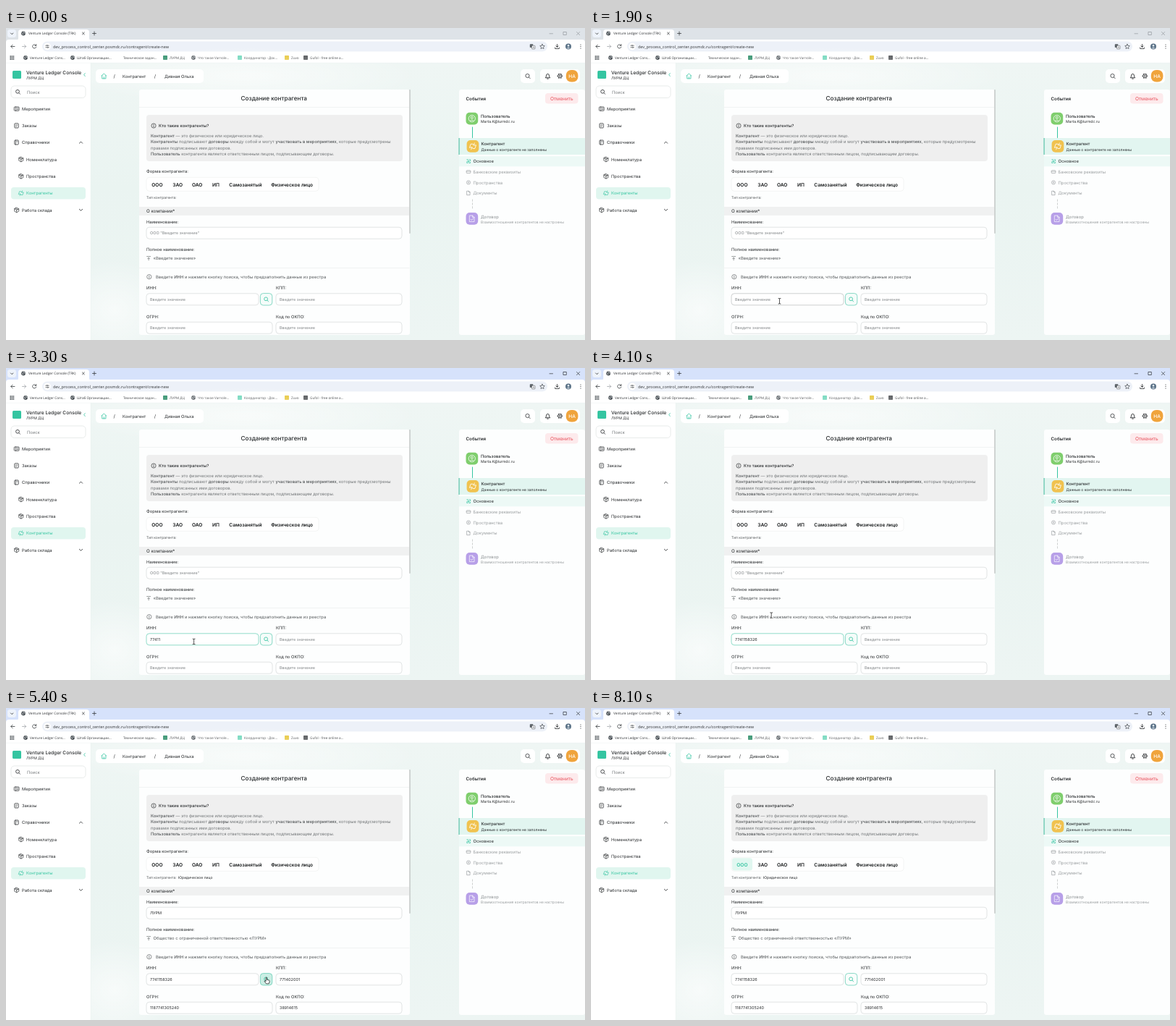
Recreate the animation shown at these times as an HTML page. Size 800x431 px, loop 8.2 s.

```html
<!DOCTYPE html>
<html lang="ru">
<head>
<meta charset="utf-8">
<title>Создание контрагента</title>
<style>
html, body { margin: 0; width: 100%; height: 100%; overflow: hidden; background: #fff; }
svg { display: block; width: 800px; height: 431px; }
text { font-family: Inter, Roboto, sans-serif; text-rendering: geometricPrecision; white-space: pre; }
text.ui { font-family: "Open Sans", "Noto Sans", sans-serif; }
</style>
</head>
<body>
<svg id="stage" viewBox="0 0 800 431" xmlns="http://www.w3.org/2000/svg">
  <defs>
    <linearGradient id="bg" x1="0" y1="0" x2="0" y2="1">
      <stop offset="0" stop-color="#eff6f4"/><stop offset=".45" stop-color="#eaf4f1"/><stop offset="1" stop-color="#edf5f3"/>
    </linearGradient>
    <radialGradient id="glow">
      <stop offset="0" stop-color="#fff" stop-opacity=".6"/><stop offset="1" stop-color="#fff" stop-opacity="0"/>
    </radialGradient>
  </defs>
</svg>
<script>
const LOOP = 8200, CLICK_FIELD = 2200, TYPE_FROM = 2800, TYPE_STEP = 90;
const OVER_BUTTON = 4800, CLICK_BUTTON = 5000, FILLED = 5400;
const MINT = '#35c5a1', EDGE = '#62cdb3', INK = '#26292b', SOFT = '#55595b', PALE = '#999d9f', B = 5.83;
const svg = document.getElementById('stage');

function add(tag, attrs, parent = svg) {
  const el = document.createElementNS('http://www.w3.org/2000/svg', tag);
  for (const k in attrs) el.setAttribute(k, attrs[k]);
  return parent.appendChild(el);
}
const box = (x, y, r, b, fill, rx = 0, stroke = 'none', w = .6) =>
  add('rect', { x, y, width: r - x, height: b - y, rx, fill, stroke, 'stroke-width': w });
const line = (d, stroke = INK, w = .8, parent = svg) =>
  add('path', { d, fill: 'none', stroke, 'stroke-width': w, 'stroke-linecap': 'round', 'stroke-linejoin': 'round' }, parent);
const ring = (cx, cy, r, stroke = INK, w = .8, fill = 'none') =>
  add('circle', { cx, cy, r, fill, stroke, 'stroke-width': w });

// Parts between asterisk pairs ("**") are set in medium weight.
function label(x, y, str, size = B, fill = INK, weight = 400, anchor = 'start') {
  const el = add('text', { x, y, 'font-size': size, fill, 'font-weight': weight, 'text-anchor': anchor });
  str.split('**').forEach((part, i) => {
    if (part) add('tspan', i % 2 ? { 'font-weight': 500, fill: '#505456' } : {}, el).textContent = part;
  });
  return el;
}
function ui(x, y, str, size = 4.6, fill = '#303336') {
  const el = label(x, y, str, size, fill);
  el.setAttribute('class', 'ui');
  return el;
}
function globe(x, y) {
  ring(x, y, 2.9, 'none', 0, '#4d5357');
  line(`M${x - 2} ${y - .8}l1.6 1l-.5 1.5M${x + .3} ${y - 2.2}l.5 1.4l1.5 .3`, '#e7ebee', .7);
}
function glass(x, y, r, color, w = .9) {
  ring(x - .5, y - .5, r, color, w);
  line(`M${x + r * .6} ${y + r * .6}l${r * .65} ${r * .65}`, color, w);
}
function info(x, y, color = SOFT) {
  ring(x, y, 3.1, color, .65);
  line(`M${x} ${y - .2}v1.7M${x} ${y - 1.5}v.1`, color, .75);
}
function cube(x, y, color) {
  line(`M${x} ${y - 3.3}l3 1.6v3.4l-3 1.6l-3 -1.6v-3.4zM${x - 3} ${y - 1.7}l3 1.6l3 -1.6M${x} ${y}v3.2M${x - 1.5} ${y - 2.5}l3 1.6`, color, .65);
}
// Two hands meeting: a slanted pair of interlocking outlines.
function shake(x, y, color, s = 1) {
  const g = add('g', { transform: `translate(${x} ${y}) scale(${s})` });
  line('M-3.4 1.2l1.2 -3.6h2.2l1 1.2h2.4l-1.2 3.6h-2.2l-1 -1.2zM-1.8 3.4l1 -2.2M1.8 -3.4l-1 2.2', color, .65, g);
}
function pin(x, y, color) {
  ring(x, y, 2.6, color, .65);
  ring(x, y, .9, color, .6);
}
function sheet(x, y, color, s = 1) {
  line(`M${x - 2.2 * s} ${y - 3 * s}h${2.8 * s}l${1.7 * s} ${1.7 * s}v${4.3 * s}h${-4.5 * s}zM${x + .6 * s} ${y - 3 * s}v${1.7 * s}h${1.7 * s}`, color, .7);
}

// Browser chrome
const strip = box(0, 0, 800, 20, '#dee3e8');
box(0, 16, 800, 48, '#fff', 4);
box(2, 2, 14, 13, '#eef3fb', 3.5);
line('M6.5 7l1.7 1.7l1.7 -1.7', INK, .8);
add('path', { d: 'M14 17q3 0 3 -3v-8q0 -4 4 -4h90q4 0 4 4v8q0 3 3 3z', fill: '#fff' });
globe(24, 7.5);
ui(31, 9.3, 'Venture Ledger Console (TRK)', 4.75);
line('M105.4 6l3 3m0 -3l-3 3', INK, .7);
line('M119.5 7.5h5m-2.5 -2.5v5', INK, .7);
const windowKeys = line('M751 7.8h4.5M770.3 5.5h4v4h-4zM788.5 5.5l4.2 4.2m0 -4.2l-4.2 4.2', INK, .65);

line('M12 25.5h-5.2m2.3 -2.3l-2.3 2.3l2.3 2.3', '#3c4043', .8);
line('M22.5 25.5h5.2m-2.3 -2.3l2.3 2.3l-2.3 2.3', '#a5a9ac', .8);
line('M41.4 24a2.6 2.6 0 1 0 .3 2.3M41.8 22.6v1.8h-1.8', '#3c4043', .8);
box(50, 18.5, 748, 32.5, '#edf1f8', 7);
ring(57, 25.5, 4.8, 'none', 0, '#fff');
line('M54.8 24.2h1.2m1.8 0h1.5M54.8 26.8h1.8m1.7 0h1', '#45494c', .7);
ring(56.9, 24.2, .7, '#45494c', .6);
ring(57.6, 26.8, .7, '#45494c', .6);
ui(65, 27.5, 'dev_process_control_center.posmdc.ru/contragent/create-new', 5.5);
box(723.8, 22.3, 728.3, 27, '#5b6166', .7);
box(726.5, 24.3, 731, 29, '#fff', .7, '#5b6166', .6);
line('M728 27.8l.9 -2.2l.9 2.2', '#5b6166', .5);
line('M741 22.3l1 2.1l2.3 .3l-1.7 1.6l.4 2.3l-2 -1.1l-2 1.1l.4 -2.3l-1.7 -1.6l2.3 -.3z', '#3c4043', .65);
line('M761.5 22.5v4m-1.7 -1.7l1.7 1.7l1.7 -1.7M758.7 27v1.6h5.6v-1.6', INK, .8);
ring(777, 25.5, 4, 'none', 0, '#5c7388');
ring(777, 24.4, 1.3, 'none', 0, '#e3eaf0');
add('path', { d: 'M774.6 28.3q2.4 -3 4.8 0z', fill: '#e3eaf0' });
[23, 25.5, 28].forEach(y => ring(794, y, .6, 'none', 0, INK));

for (let i = 0; i < 9; i++) box(5.5 + i % 3 * 2.1, 38.3 + (i / 3 | 0) * 2.1, 7 + i % 3 * 2.1, 39.8 + (i / 3 | 0) * 2.1, '#4d5357');
[[33, 'Venture Ledger Cons...'], [98, 'Штаб Организации...'], [162, 'Техническое задан...'], [226, 'ЛУРМ ДЦ'],
 [265, 'Что такое Varnole...'], [329, 'Координатор - Док...'], [394, 'Zuvo'], [420, 'Gufol - free online a...']]
  .forEach(([x, s]) => ui(x, 42.7, s, 4.65));
globe(27, 41); globe(92, 41); globe(259, 41);
[[220, '#2f8f6b'], [323, '#62d3b5'], [388, '#e5c32f'], [414, '#4a4d50']].forEach(([x, c]) => box(x - 3, 38, x + 3, 44, c, .7));

// Page background and sidebar
box(0, 48, 800, 431, 'url(#bg)');
add('ellipse', { cx: 150, cy: 390, rx: 80, ry: 70, fill: 'url(#glow)' });
add('ellipse', { cx: 330, cy: 66, rx: 240, ry: 40, fill: 'url(#glow)' });
box(0, 48, 117, 431, '#fff');
line('M0 48.2H800', '#eaeeee', .5);
line('M117.2 48.5V431', '#e7eeec', .5);
box(9, 59, 21, 70, MINT, 1.5);
label(28, 64.4, 'Venture Ledger Console', 6.6, INK, 500);
label(28, 71, 'ЛУРМ ДЦ', 5.1);
line('M109.3 62.6l-1.7 2l1.7 2', MINT, .8);
box(7, 80, 110, 96.5, '#fff', 4.5, '#d9dddc');
glass(16.5, 88.3, 2.4, INK, .8);
label(29, 90.5, 'Поиск', B, '#777b7d');
box(7, 220, 110, 236.5, '#e0f6ef', 4);
[[22, 113.7, 'Мероприятия'], [22, 137.1, 'Заказы'], [22, 160.3, 'Справочники'], [28, 183.7, 'Номенклатура'],
 [28, 207, 'Пространства'], [28, 230.4, 'Контрагенты', MINT], [22, 253.7, 'Работа склада']]
  .forEach(([x, y, s, c]) => label(x, y, s, B, c || INK));
box(11.3, 109, 18, 114.3, 'none', .8, INK, .75);
line('M13.5 109v5.3M15 110.8h1.7M15 112.5h1.7', INK, .6);
box(11.8, 131.8, 17.2, 138, 'none', .8, INK, .75);
line('M13.3 134h2.3M13.3 136h1.5', INK, .6);
box(11.8, 155, 17.2, 161, 'none', .8, INK, .75);
line('M13.4 155v6M14.8 157h1.2', INK, .6);
cube(20.8, 181.5, INK);
cube(20.8, 204.8, INK);
shake(20.8, 228.2, MINT);
cube(14.7, 251.5, INK);
line('M101.4 159.2l2.1 -2.1l2.1 2.1M101.4 250.3l2.1 2.1l2.1 -2.1', INK, .85);

// Page header
box(124, 57, 273, 76, '#fff', 5);
line('M132 66l3.3 -3l3.3 3M132.7 65.6v4.3h5.2v-4.3M135.3 69.7v-2', MINT, .8);
label(148.5, 69, '/', 6.4);
label(161, 68.8, 'Контрагент');
label(204.8, 69, '/', 6.4);
label(219, 68.8, 'Дивная Ольха');
box(711, 57, 731, 76, '#fff', 5);
glass(721, 66.5, 2.6, INK, .75);
box(738, 57, 793, 76, '#fff', 5);
line('M745.5 68.5q1 -.8 1 -2.7q0 -2.2 2 -2.4q2 .2 2 2.4q0 1.9 1 2.7zM747.7 70.1h1.6', INK, .9);
ring(765.3, 66.3, 2.7, INK, .9);
ring(765.3, 66.3, 1, INK, .75);
for (let a = 0; a < 6; a++) {
  const c = Math.cos(a * Math.PI / 3), s = Math.sin(a * Math.PI / 3);
  line(`M${765.3 + c * 3} ${66.3 + s * 3}L${765.3 + c * 3.4} ${66.3 + s * 3.4}`, INK, 1);
}
box(773.8, 58, 790.4, 74.6, '#f0a43c', 7);
label(782.1, 68.7, 'НА', 6.6, '#fff', 500, 'middle');

// Form card
box(184, 85, 558, 424, '#fdfefe', 3);
label(370.3, 100, 'Создание контрагента', 8.2, INK, 500, 'middle');
line('M184 109.5H557M184 331.5H557', '#e9ecec', .6);
box(557.3, 85, 558.7, 284, '#bfc3c2', .7);
box(194, 120, 548, 184, '#efefef', 4);
info(204, 135, INK);
label(211, 137.2, 'Кто такие контрагенты?', B, INK, 500);
['**Контрагент** — это физическое или юридическое лицо.',
 '**Контрагенты** подписывают **договоры** между собой и могут **участвовать в мероприятиях**, которые предусмотрены',
 'правами подписанных ими договоров.',
 '**Пользователь** контрагента является ответственным лицом, подписывающим договоры.']
  .forEach((s, i) => label(200, 150.5 + i * 8.5, s, B, '#707476'));

label(194, 200.2, 'Форма контрагента:');
box(194, 206.3, 432, 225.3, '#fff', 4, '#eceeed');
const pick = box(195, 207.2, 223, 224.4, '#e1f7f0', 3.5);
const forms = [[201.3, 'ООО'], [230.3, 'ЗАО'], [257, 'ОАО'], [285, 'ИП'], [308.3, 'Самозанятый'], [366.3, 'Физическое лицо']]
  .map(([x, s]) => label(x, 218.6, s, 6.58, '#16191a', 600));
label(194, 235.6, 'Тип контрагента:', 5, SOFT);
const kind = label(238, 235.6, 'Юридическое лицо', 5, INK);
box(184, 247, 557, 259, '#f0f1f1');
label(194, 255.3, 'О компании*', 6.2);
label(194, 269.8, 'Наименование:');
label(194, 308.2, 'Полное наименование:');
line('M194.6 315.6h5M197.1 320.8v-3.4m-1.4 1.4l1.4 -1.4l1.4 1.4', SOFT, .6);
const fullName = label(203.5, 320.2, '', B, SOFT);
info(197.8, 343.7);
label(207, 345.9, 'Введите **ИНН** и нажмите кнопку поиска, чтобы предзаполнить данные из реестра', B, SOFT);
label(194, 361.3, 'ИНН:');
label(373, 361.3, 'КПП:');
label(194, 401, 'ОГРН:');
label(373, 401, 'Код по ОКПО:');

const HINT = 'Введите значение', BORDER = '#d5d9d8';
function field(x, y, r, value, hint = HINT) {
  return { frame: box(x, y, r, y + 16, '#fff', 4, BORDER, .7), text: label(x + 5, y + 10.1, '', 5.5), value, hint };
}
function show(f, value) {
  f.text.textContent = value || f.hint;
  f.text.setAttribute('fill', value ? INK : '#85898b');
}
const name = field(194, 275.2, 547, 'ЛУРМ', 'ООО "Введите значение"');
const inn = field(194, 366.8, 349, '7741158326');
const filled = [name, field(373, 366.8, 547, '771402001'), field(194, 406.2, 368, '1187741305240'), field(373, 406.2, 547, '38914615')];
const button = box(351.4, 366.6, 367.8, 383, '#fff', 4, EDGE, .75);
glass(359.6, 374.8, 2.4, MINT, .85);

// Events panel
box(626, 85, 800, 424, '#fdfefe', 3);
label(635.5, 99.6, 'События', 6.25, INK, 600);
box(745, 90, 790.5, 104.5, '#fdeaec', 4);
label(767.8, 99.6, 'Отменить', 6.6, '#e8505b', 400, 'middle');
box(626, 152, 800, 175, '#e2f5f0');
box(625.5, 152, 626.6, 175, '#4fbfa3');
box(626, 177.3, 800, 191.3, '#edf9f6');
line('M644.5 137v14.5', MINT, 1);
line('M644.5 237v13', '#c3c7c6', .8).setAttribute('stroke-dasharray', '2.4 2.4');
box(635.5, 116.8, 652.2, 133.5, '#7fce6d', 5);
ring(643.8, 125.1, 4.6, '#fff', .8);
ring(643.8, 123.9, 1.5, '#fff', .8);
line('M641.2 128.2q2.6 -2.3 5.2 0', '#fff', .8);
box(636.6, 155, 653.3, 171.8, '#f0c24f', 5);
shake(645, 163.4, '#fff', 1.3);
box(635.5, 255, 652.2, 271.8, '#b79fe8', 5);
sheet(643.8, 263.4, '#fff', 1.4);
line('M642.2 264.3l1.2 1.2l2.2 -2.3', '#fff', .75);
label(656, 124.2, 'Пользователь', B, INK, 500);
label(656, 131, 'Marta.K@lurmdc.ru', 5.1);
label(656.5, 162.4, 'Контрагент', B, INK, 500);
label(656.5, 169.8, 'Данные о контрагенте не заполнены', 5);
label(645.5, 186.4, 'Основное');
[[201, 'Банковские реквизиты'], [215.6, 'Пространства'], [230.2, 'Документы']].forEach(([y, s]) => label(645.5, y, s, B, PALE));
label(656, 263, 'Договор', B, PALE, 500);
label(656, 269.7, 'Взаимоотношения контрагентов не настроены', 5, PALE);
line('M636.8 181.8h1.7m2 0h1v1.7m0 2v1h-1.7m-2 0h-1v-1.7M637.6 184.2h2.8M639 182.8v2.8', MINT, .75);
box(636.2, 196.8, 641.8, 200.6, 'none', .7, PALE, .65);
line('M636.2 198.2h5.6', PALE, .6);
pin(639, 213.4, PALE);
sheet(639, 228, PALE, .9);

// Pointer
const pointer = add('g', {});
const beam = add('g', {}, pointer);
const beamPath = 'M-1.5 -3.6h1.1l.4 .4l.4 -.4h1.1M0 -3.2v6.6M-1.5 3.8h1.1l.4 -.4l.4 .4h1.1';
line(beamPath, '#fff', 1.4, beam);
line(beamPath, '#111', .7, beam);
const hand = add('path', {
  d: 'M-.9 -3.6q.8 -.8 1.5 0v3l2.8 .6q.9 .3 .8 1.3l-.6 2.6l-.5 1h-3.4l-2.6 -3.2q-.1 -1 1 -.8l1 .8z',
  fill: '#fff', stroke: '#16191a', 'stroke-width': .75, 'stroke-linejoin': 'round'
}, pointer);

const PATH = [[300, 300, 392], [900, 262, 379], [1900, 260.5, 377.2], [2500, 259.6, 377.8], [3300, 259.6, 377.8],
  [3900, 249.2, 341.5], [4200, 249.2, 341.5], [4800, 360, 376]];
const clamp = v => Math.max(0, Math.min(1, v));
const ease = v => v * v * (3 - 2 * v);

function place(t) {
  let p = PATH[0].slice(1);
  for (let i = 1; i < PATH.length; i++) {
    const [t0, x0, y0] = PATH[i - 1], [t1, x1, y1] = PATH[i];
    if (t >= t0) {
      const k = ease(clamp((t - t0) / (t1 - t0)));
      p = [x0 + (x1 - x0) * k, y0 + (y1 - y0) * k];
    }
  }
  return p;
}

function draw(t) {
  const active = t >= CLICK_FIELD, done = t >= FILLED, onButton = t >= OVER_BUTTON;
  strip.setAttribute('fill', active ? '#d6e2fb' : '#dee3e8');
  windowKeys.setAttribute('stroke', active ? '#1f2224' : '#8d9296');

  show(inn, inn.value.slice(0, Math.max(0, Math.floor((t - TYPE_FROM) / TYPE_STEP))));
  const focused = active && t < CLICK_BUTTON, hovered = t >= 900 && !active;
  inn.frame.setAttribute('stroke', focused ? EDGE : hovered ? '#b9bebd' : BORDER);

  filled.forEach(f => show(f, done ? f.value : ''));
  fullName.textContent = done ? 'Общество с ограниченной ответственностью «ЛУРМ»' : '«Введите значение»';
  kind.setAttribute('opacity', done ? 1 : 0);
  const k = clamp((t - FILLED) / 300);
  pick.setAttribute('opacity', k);
  forms[0].setAttribute('fill', `rgb(${22 + 31 * k},${25 + 172 * k},${26 + 135 * k})`);

  const leave = clamp((t - 6300) / 500);
  button.setAttribute('fill', onButton && leave < 1 ? '#cbeee4' : '#f5fcfa');
  button.setAttribute('fill-opacity', onButton ? 1 - leave * .7 : 1);
  const [x, y] = place(t);
  pointer.setAttribute('transform', `translate(${x} ${y})`);
  pointer.setAttribute('opacity', t < PATH[0][0] ? 0 : 1 - leave);
  beam.setAttribute('opacity', onButton ? 0 : 1);
  hand.setAttribute('opacity', onButton ? 1 : 0);
}

const start = performance.now();
function tick() {
  const t = (performance.now() - start) % LOOP;
  draw(Math.floor(t / 100) * 100);
  requestAnimationFrame(tick);
}
tick();
</script>
</body>
</html>
```
